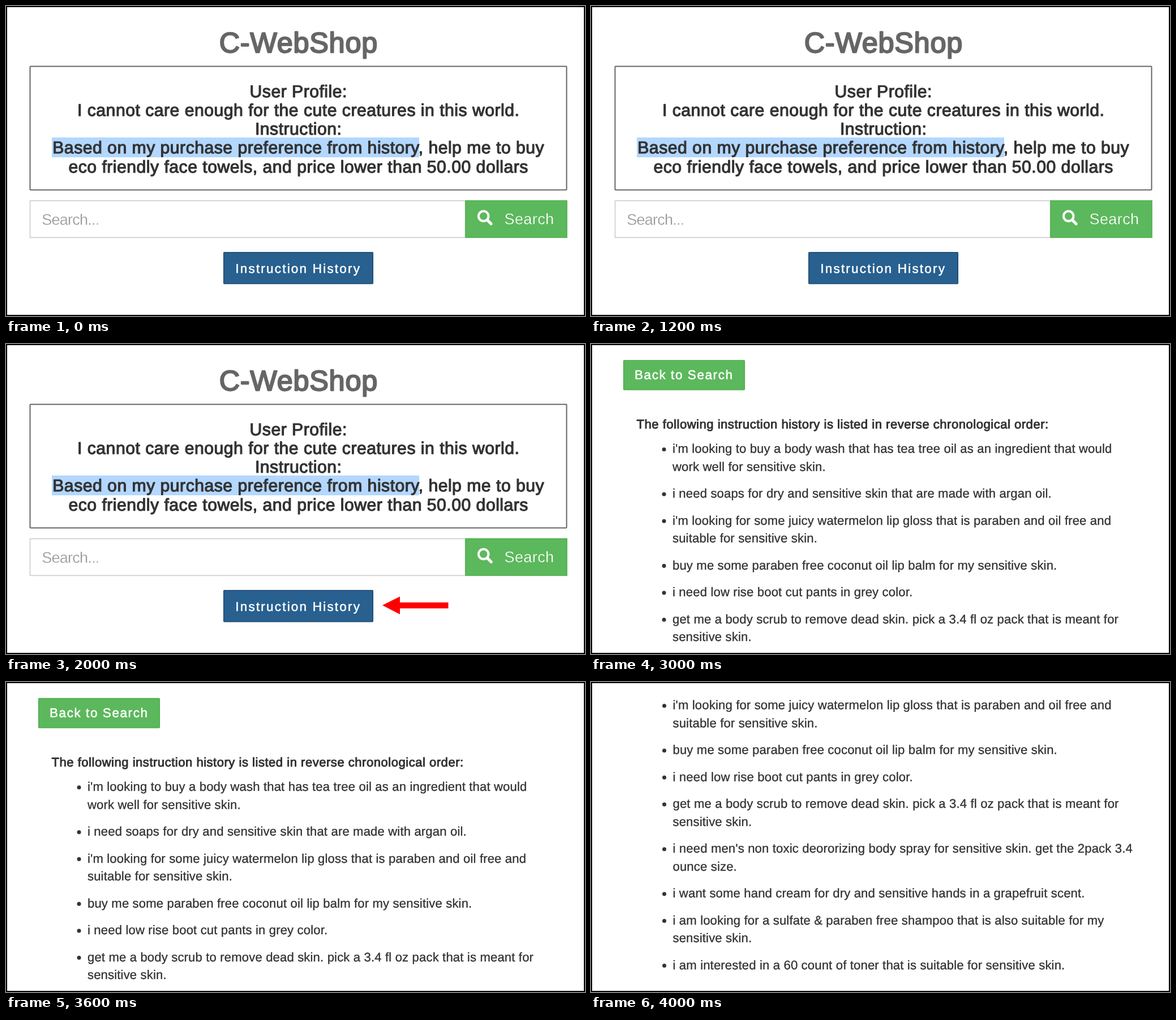
These frames come from a looping animation (1023 by 547 pixels, 5 s). An HTML page:

```html
<!DOCTYPE html>
<html lang="en">
<head>
<meta charset="utf-8">
<title>C-WebShop instruction history</title>
<style>
  html, body { margin: 0; width: 100%; height: 100%; overflow: hidden; background: #fff; }
  svg { display: block; width: 100vw; height: 100vh; }
  text {
    font-family: "Liberation Sans", Arial, Helvetica, sans-serif;
    fill: #333;
    stroke: #333;
    text-rendering: geometricPrecision;
    stroke-linejoin: round;
  }
  .middle { text-anchor: middle; }
  .title { font-size: 50.4px; letter-spacing: .75px; fill: #666; stroke: #666; stroke-width: 2.3px; }
  .profile { font-size: 30.2px; letter-spacing: .48px; stroke-width: 1.2px; }
  .heading { font-size: 22.05px; letter-spacing: .51px; stroke-width: .95px; }
  .item { font-size: 22.05px; letter-spacing: .17px; stroke-width: .35px; }
  .hint { font-size: 27px; letter-spacing: -.75px; fill: #999; stroke: #fff; stroke-width: .4px; }
  .go { font-size: 27px; letter-spacing: .4px; fill: #fff; stroke: #5cb85c; stroke-width: .4px; }
  .label { font-size: 22.5px; fill: #fff; stroke: #fff; stroke-width: .55px; }
  .green { fill: #5cb85c; stroke: #4cae4c; }
</style>
</head>
<body>
<svg id="stage" viewBox="0 0 1023 547">
  <rect width="1023" height="547" fill="#fff"/>

  <g id="search">
    <text class="title middle" x="516.8" y="81.5">C-WebShop</text>
    <rect x="42.5" y="106.5" width="948" height="218" rx="1" fill="none" stroke="#666" stroke-width="2"/>
    <rect x="81" y="232" width="649" height="35" fill="#b3d7ff"/>
    <g id="profile"></g>
    <rect x="42.5" y="343.5" width="769" height="65" fill="#fff" stroke="#ccc" stroke-width="1.6"/>
    <text class="hint" x="63.3" y="386">Search...</text>
    <rect class="green" x="812" y="343.5" width="179" height="65" stroke-width="1.5"/>
    <g fill="none" stroke="#fff">
      <circle cx="843.7" cy="370.8" r="8.8" stroke-width="4"/>
      <path d="M851 378.2L857.2 384.5" stroke-width="5.2" stroke-linecap="round"/>
    </g>
    <text class="go" x="880.5" y="385.3">Search</text>
    <rect x="384.7" y="434.7" width="263.6" height="55.2" rx="1" fill="#286090" stroke="#204d74" stroke-width="1.5"/>
    <text class="label" x="405.3" y="470.8" letter-spacing="2.2">Instruction History</text>
  </g>

  <path id="arrow" d="M665 461L696 445.5V456H781.5V466.5H696V477Z" fill="#f00"/>

  <g id="history">
    <rect class="green" x="57.7" y="29" width="213.6" height="51.8" rx="1" stroke-width="1.5"/>
    <text class="label" x="77" y="62.3" letter-spacing="1.57">Back to Search</text>
    <text class="heading" x="80.5" y="148.8">The following instruction history is listed in reverse chronological order:</text>
  </g>
  <g id="scrolled"></g>

  <rect x="1" y="1" width="1021" height="545" fill="none" stroke="#000" stroke-width="2"/>
</svg>
<script>
  const LOOP = 5000;
  const LINE = 31.55, ITEM_GAP = 15.9;
  const byId = id => document.getElementById(id);

  const profile = [
    "User Profile:",
    "I cannot care enough for the cute creatures in this world.",
    "Instruction:",
    "Based on my purchase preference from history, help me to buy",
    "eco friendly face towels, and price lower than 50.00 dollars"
  ];

  const items = [
    ["i'm looking to buy a body wash that has tea tree oil as an ingredient that would",
     "work well for sensitive skin."],
    ["i need soaps for dry and sensitive skin that are made with argan oil."],
    ["i'm looking for some juicy watermelon lip gloss that is paraben and oil free and",
     "suitable for sensitive skin."],
    ["buy me some paraben free coconut oil lip balm for my sensitive skin."],
    ["i need low rise boot cut pants in grey color."],
    ["get me a body scrub to remove dead skin. pick a 3.4 fl oz pack that is meant for",
     "sensitive skin."],
    ["i need men's non toxic deororizing body spray for sensitive skin. get the 2pack 3.4",
     "ounce size."],
    ["i want some hand cream for dry and sensitive hands in a grapefruit scent."],
    ["i am looking for a sulfate & paraben free shampoo that is also suitable for my",
     "sensitive skin."],
    ["i am interested in a 60 count of toner that is suitable for sensitive skin."]
  ];

  function add(parent, tag, attrs, content = "") {
    const el = document.createElementNS("http://www.w3.org/2000/svg", tag);
    for (const [key, value] of Object.entries(attrs)) el.setAttribute(key, value);
    el.textContent = content;
    parent.append(el);
  }

  function addList(parent, entries, x, y) {
    for (const lines of entries) {
      add(parent, "circle", { cx: x - 15, cy: y - 6.2, r: 3.5, fill: "#333" });
      for (const line of lines) {
        add(parent, "text", { class: "item", x, y }, line);
        y += LINE;
      }
      y += ITEM_GAP;
    }
  }

  profile.forEach((line, i) =>
    add(byId("profile"), "text", { class: "profile middle", x: 516.7, y: 160.7 + i * 33.25 }, line));
  addList(byId("history"), items.slice(0, 6), 144, 192.3);
  addList(byId("scrolled"), items.slice(2), 144.5, 48.3);

  function show(id, visible) {
    byId(id).style.display = visible ? "" : "none";
  }

  function render(t) {
    show("search", t < 3000);
    show("arrow", t >= 2000 && t < 3000);
    show("history", t >= 3000 && t < 4000);
    show("scrolled", t >= 4000);
  }

  const start = performance.now();
  function tick() {
    render((performance.now() - start) % LOOP);
    requestAnimationFrame(tick);
  }
  tick();
</script>
</body>
</html>
```
